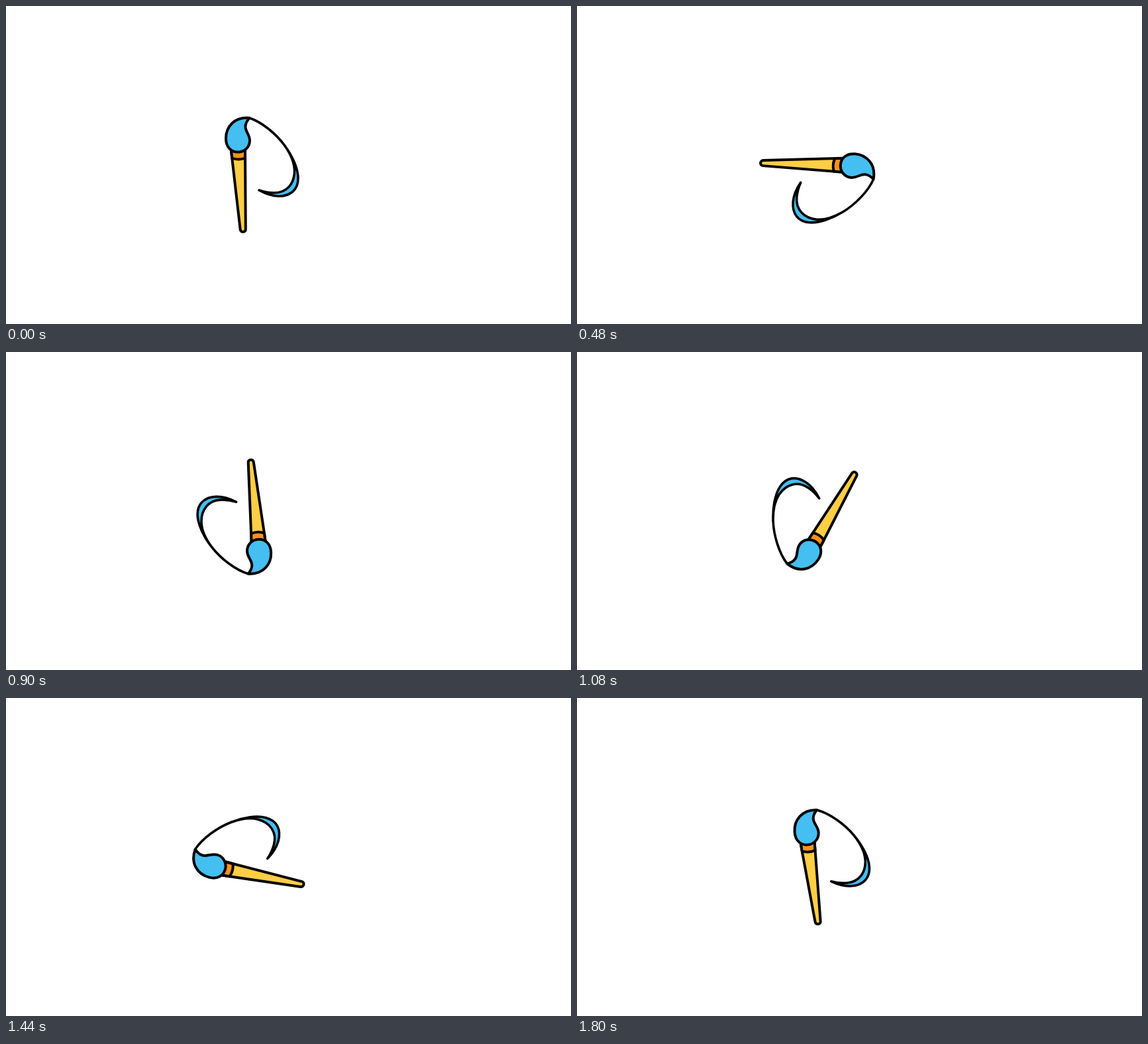
Recreate the animation shown at these times as an HTML page. Size 853 by 480 pixels, loop 1860 ms.

```html
<!DOCTYPE html>
<html lang="en">
<head>
<meta charset="utf-8">
<title>Spinning paintbrush</title>
<style>
  html, body { margin: 0; width: 100%; height: 100%; overflow: hidden; background: #fff; }
  svg { display: block; width: 100%; height: 100%; }
  #brush { stroke: #000; stroke-width: 4; stroke-linejoin: round; stroke-linecap: round; }
  .paint { fill: #45bef1; }
  .wood { fill: #ffce45; }
  .band { fill: #f8921c; }
  .line { fill: none; }
</style>
</head>
<body>
<svg viewBox="0 0 853 480">
  <g id="brush">
    <!-- paint trail: thin line, then a crescent -->
    <path class="line" stroke-width="3.6" d="M367.5 169 C386 175 408 193 421 211"/>
    <path class="paint" stroke-width="3.6" d="M421 211 C432 226 441 245 441 260 C441 277 430 287 412 287
      C401 287 391 283 382 278 C389 280.5 397 282 405 282
      C424 282 435.5 268 435.5 249 C435.5 237 430 224 421 211 Z"/>
    <!-- handle and ferrule -->
    <path class="wood" d="M340 219 L353.7 337.3 C354.2 342.3 361.8 342 361.8 337.3 L361 219 Z"/>
    <path class="band" d="M340 216 L341.2 229.5 Q351 233.5 361 229.5 L361 216 Z"/>
    <!-- bristles -->
    <path class="paint" d="M367.5 169 C364 173 361.5 177 361.5 182 C361.5 190 368 194 368 203
      C368 213 360 220.5 350 220.5 C340 220.5 332 213 332 200 C332 182 345 167 367.5 169 Z"/>
  </g>
</svg>
<script>
  const LOOP = 1860, STEP = 60, TURN = 11.87; // ms, ms, degrees per step
  const CENTER = "365.2 251.9";
  const brush = document.getElementById("brush");
  const start = performance.now();

  function draw() {
    const time = Math.max(0, performance.now() - start) % LOOP;
    const angle = Math.floor(time / STEP) * TURN;
    brush.setAttribute("transform", `rotate(${angle} ${CENTER})`);
    requestAnimationFrame(draw);
  }
  draw();
</script>
</body>
</html>
```
